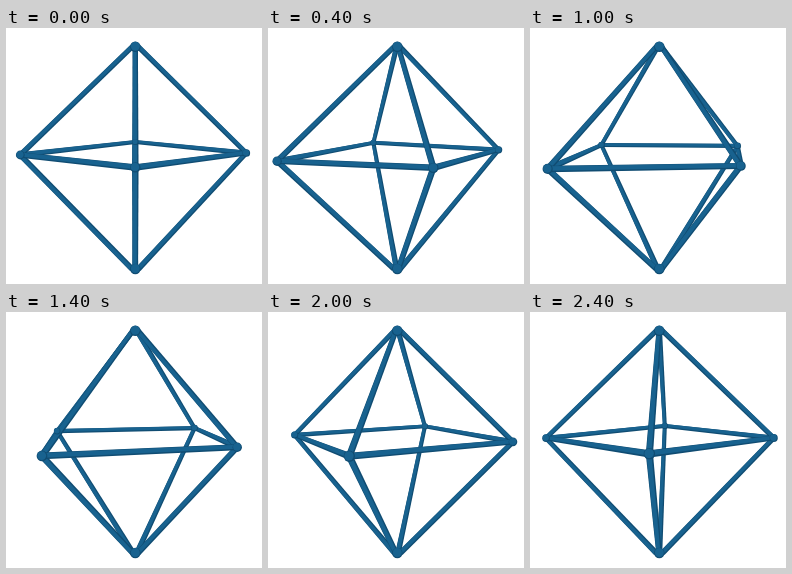
Recreate the animation shown at these times as an HTML page with a canvas. Size 256x256 px, loop 2.5 s.

```html
<!DOCTYPE html>
<html lang="en">
<head>
<meta charset="utf-8">
<title>Turning octahedron</title>
<style>
html, body { margin: 0; width: 100%; height: 100%; overflow: hidden; background: #fff; }
canvas { display: block; }
</style>
</head>
<body>
<canvas id="stage" width="256" height="256"></canvas>
<script>
const ctx = document.getElementById('stage').getContext('2d');
const LOOP = 2500, STEP = 100, CX = 129.3, CAMERA = 493;
const LIGHT = '#18628f', DARK = '#104c72';
const TOP = { x: CX, y: 18.8, z: 0, w: 5.2 };
const BOTTOM = { x: CX, y: 241, z: 0, w: 5.6 };

// The frame is slightly irregular: each corner has its own radius, tilt and sag.
const corners = [
  { start: 0,   r: 113, y: 125, tilt: 14.5, sagX: 0,  sagY: 2, w: 5 },
  { start: -90, r: 115, y: 127, tilt: 14,   sagX: -4, sagY: 7, w: 5.5 },
  { start: 180, r: 115, y: 127, tilt: 20.9, sagX: -1, sagY: 1, w: 4.8 },
  { start: 90,  r: 111, y: 125, tilt: 17.7, sagX: -1, sagY: 0, w: 4.8 }
];

function project(c, p) {
  const a = (c.start + 90 * p) * Math.PI / 180;
  const z = Math.cos(a), scale = CAMERA / (CAMERA - c.r * z);
  const sag = Math.sin(Math.PI * p);
  return {
    x: CX + c.r * Math.sin(a) * scale + c.sagX * sag,
    y: c.y + c.tilt * z * scale * 0.767 + c.sagY * sag,
    z, w: c.w * scale
  };
}

// Bars meet the rounded tips on the side that faces their corner.
function tipJoint(tip, v) {
  return { ...tip, x: tip.x + 3.2 * (v.x - CX) / 115 };
}

function disc(p, r, color) {
  ctx.fillStyle = color;
  ctx.beginPath();
  ctx.arc(p.x, p.y, r, 0, 2 * Math.PI);
  ctx.fill();
}

// Tapered bar; `size` is its share of the full width, `shift` moves it sideways.
function bar(a, b, size, shift, color) {
  const len = Math.hypot(b.x - a.x, b.y - a.y) || 1;
  let nx = -(b.y - a.y) / len, ny = (b.x - a.x) / len;
  if (nx + ny > 0) { nx = -nx; ny = -ny; }
  const at = (p, side) => {
    const d = p.w * size / 2 * side + shift;
    return [p.x + nx * d, p.y + ny * d];
  };
  ctx.fillStyle = color;
  ctx.beginPath();
  ctx.moveTo(...at(a, 1));
  ctx.lineTo(...at(b, 1));
  ctx.lineTo(...at(b, -1));
  ctx.lineTo(...at(a, -1));
  ctx.fill();
}

function draw(p) {
  ctx.clearRect(0, 0, 256, 256);
  const pts = corners.map(c => project(c, p));
  const edges = [];
  pts.forEach((v, i) => edges.push(
    [v, tipJoint(TOP, v)], [v, tipJoint(BOTTOM, v)], [v, pts[(i + 1) % 4]]));
  edges.sort((e, f) => e[0].z + e[1].z - f[0].z - f[1].z);
  for (const [a, b] of edges) {
    bar(a, b, 1, 0, DARK);
    bar(a, b, 0.7, 0.5, LIGHT);
  }
  for (const v of pts) {
    disc(v, v.w * 0.8, DARK);
    disc({ x: v.x - 0.3, y: v.y - 0.4 }, v.w * 0.66, LIGHT);
  }
  for (const tip of [TOP, BOTTOM]) {
    disc(tip, 5.3, DARK);
    disc({ x: tip.x, y: tip.y - 0.5 }, 4.5, LIGHT);
  }
}

function tick() {
  const t = performance.now() % LOOP;
  draw(Math.floor(t / STEP) * STEP / LOOP);
  requestAnimationFrame(tick);
}
tick();
</script>
</body>
</html>
```
